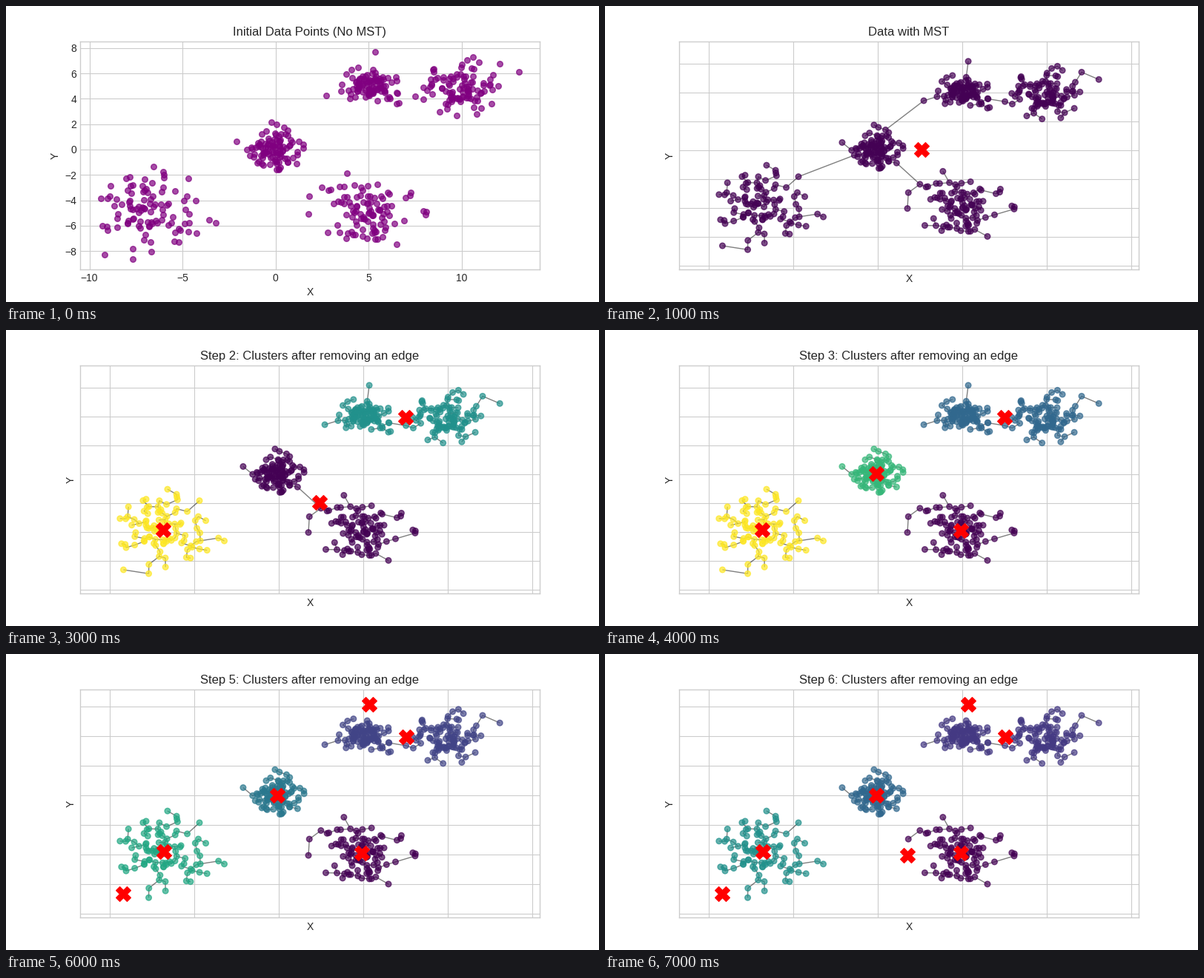
Animation of 800 by 400 pixels, one loop 8 s. Source, as a matplotlib script:

```python
import numpy as np
import matplotlib.pyplot as plt
from matplotlib.animation import FuncAnimation
from matplotlib.collections import LineCollection

plt.rcParams.update({
    "font.family": "Liberation Sans",
    "text.color": ".15",
    "axes.labelcolor": ".15",
    "axes.edgecolor": ".8",
    "axes.linewidth": 1,
    "axes.axisbelow": True,
    "axes.grid": True,
    "grid.color": ".8",
    "xtick.color": ".15",
    "ytick.color": ".15",
    "xtick.major.size": 0,
    "ytick.major.size": 0,
})

# (center, spread) of each blob
BLOBS = [((0, 0), 0.8), ((5, 5), 0.7), ((10, 5), 1.0),
         ((5, -5), 1.2), ((-7, -5), 1.5)]
DRAW_ORDER = [3, 1, 2, 0, 4]


def make_points():
    rng = np.random.RandomState(42)
    blobs = [rng.normal(center, spread, (100, 2)) for center, spread in BLOBS]
    return np.vstack([blobs[i] for i in DRAW_ORDER])


def spanning_tree(pts):
    """Prim's algorithm: (parent, child) pairs and lengths, parents first."""
    n = len(pts)
    best = np.full(n, np.inf)
    parent = np.zeros(n, int)
    done = np.zeros(n, bool)
    edges, lengths = [], []
    node = 0
    for _ in range(n - 1):
        done[node] = True
        dist = np.hypot(*(pts - pts[node]).T)
        closer = ~done & (dist < best)
        best[closer] = dist[closer]
        parent[closer] = node
        node = int(np.argmin(np.where(done, np.inf, best)))
        edges.append((parent[node], node))
        lengths.append(best[node])
    return np.array(edges), np.array(lengths)


points = make_points()
edges, lengths = spanning_tree(points)
by_length = np.argsort(-lengths)


def find_clusters(keep):
    """Index arrays of the connected parts, single points last."""
    root = np.arange(len(points))
    for (a, b), kept in zip(edges, keep):
        if kept:
            root[b] = root[a]
    groups = [np.flatnonzero(root == r) for r in np.unique(root)]
    return sorted(groups, key=lambda g: (len(g) == 1, g[0]))


def draw_raw():
    ax.scatter(*points.T, s=30, c="purple", alpha=0.7)
    ax.tick_params(labelbottom=True, labelleft=True)
    ax.set_title("Initial Data Points (No MST)")


def draw_forest(cuts):
    keep = np.ones(len(edges), bool)
    keep[by_length[:cuts]] = False
    groups = find_clusters(keep)
    label = np.zeros(len(points))
    for i, group in enumerate(groups):
        label[group] = i
    centers = np.array([points[g].mean(axis=0) for g in groups])

    segments = points[edges[keep]]
    ax.add_collection(LineCollection(segments, colors="black",
                                     linewidths=1, alpha=0.5, zorder=1))
    ax.scatter(*points.T, s=30, c=label, cmap="viridis", vmin=0,
               vmax=max(cuts, 1), alpha=0.7, zorder=2)
    ax.scatter(*centers.T, s=200, c="red", marker="X", zorder=3)

    # 5 % padding around the edges, then 5 % axes margin
    lo, hi = segments.min(axis=(0, 1)), segments.max(axis=(0, 1))
    mid, half = (lo + hi) / 2, (hi - lo) * 0.605
    ax.set_xlim(mid[0] - half[0], mid[0] + half[0])
    ax.set_ylim(mid[1] - half[1], mid[1] + half[1])
    ax.tick_params(labelbottom=False, labelleft=False)
    ax.set_title(f"Step {cuts}: Clusters after removing an edge"
                 if cuts else "Data with MST")


def draw(frame):
    ax.clear()
    if frame == 0:
        draw_raw()
    else:
        draw_forest(frame - 1)
    ax.set_xlabel("X")
    ax.set_ylabel("Y")


fig, ax = plt.subplots(figsize=(8, 4), dpi=100)
anim = FuncAnimation(fig, draw, frames=8, interval=1000, repeat=True)
plt.show()
```
